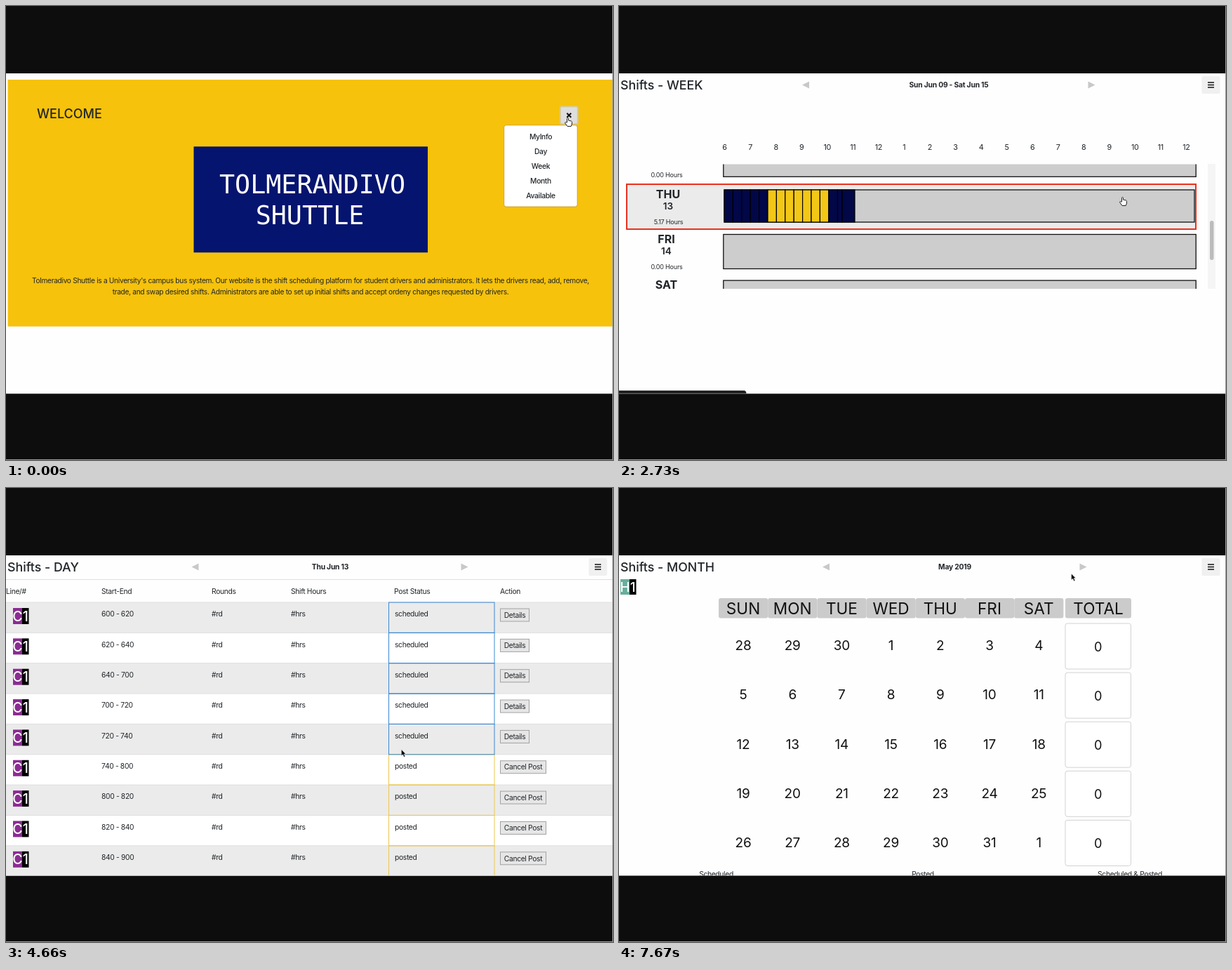
Recreate the animation shown at these times as an HTML page. Size 865 px wide and 647 px high, loop 7770 ms.

```html
<!DOCTYPE html>
<html lang="en">
<head>
<meta charset="utf-8">
<title>Shift scheduling tour</title>
<style>
html, body { margin: 0; width: 100%; height: 100%; overflow: hidden; background: #fff; }
svg { display: block; width: 100vw; height: 100vh; }
text { font-family: Inter, "Open Sans", sans-serif; white-space: pre; }
.mono { font-family: "DejaVu Sans Mono", monospace; }
</style>
</head>
<body>
<svg id="stage" viewBox="0 0 865 647"></svg>
<script>
const LOOP = 7770;
const GROUPS = [130, 1230, 2310, 3400, 4510, 5610, 6710]; // eight steps start at each
const NAVY = '#05146f', GOLD = '#f6c20b', INK = '#212529', BODY = 10.3;
const range = n => [...Array(n).keys()];
const each = (n, fn) => range(n).map(fn).join('');

function text(x, y, str, { size = BODY, weight = 400, anchor = 'middle', fill = INK,
    gap = size < 12 ? -0.34 : 0, cls = '' } = {}) {
  return `<text class="${cls}" x="${x}" y="${y + size * 0.36}" font-size="${size}" font-weight="${weight}"` +
    ` text-anchor="${anchor}" fill="${fill}" letter-spacing="${gap}">${str}</text>`;
}
const rect = (x, y, w, h, fill, stroke = 'none', line = 1, r = 0) =>
  `<rect x="${x}" y="${y}" width="${w}" height="${h}" rx="${r}" fill="${fill}" stroke="${stroke}" stroke-width="${line}"/>`;
const path = (d, stroke, line = 1, fill = 'none') =>
  `<path d="${d}" fill="${fill}" stroke="${stroke}" stroke-width="${line}"/>`;

const title = (str, y = 113) => text(2, y, str, { size: 17.8, weight: 500, anchor: 'start' });

function menu(x, y, shade = '#f0f0f0') {
  return rect(x - 13, y - 12.5, 26, 25, shade, 'none', 0, 2) +
    path(`M${x - 4.5} ${y - 3.5}h9m-9 3.5h9m-9 3.5h9`, '#111', 1.5);
}

function pager(left, right, mid, label) {
  return path(`M${left + 5} 107.5v10l-10-5z`, 'none', 0, '#c8c8c8') +
    path(`M${right - 5} 107.5v10l10-5z`, 'none', 0, '#c8c8c8') +
    text(mid, 112.5, label, { weight: 700, gap: -0.2 });
}

function badge(x, y, w1, w2, h, letter, digit, fill) {
  const style = { size: h * 0.85, weight: 500, fill: '#fff' };
  return rect(x, y, w1, h, fill) + rect(x + w1, y, w2, h, '#000') +
    text(x + w1 / 2, y + h / 2, letter, style) + text(x + w1 + w2 / 2, y + h / 2, digit, style);
}

function welcome() {
  const name = { size: 36.7, fill: '#fff', cls: 'mono' };
  const copy = { size: 10.2, gap: -0.32 };
  return rect(2.6, 105, 862, 351.7, GOLD) +
    text(44, 153.5, 'WELCOME', { size: 18, weight: 500, anchor: 'start' }) +
    rect(267.5, 200.3, 333.5, 151, NAVY) +
    text(436.5, 254, 'TOLMERANDIVO', name) + text(433, 298, 'SHUTTLE', name) +
    text(434, 391.5, "Tolmeradivo Shuttle is a University's campus bus system. Our website is the shift scheduling platform for student drivers and administrators. It lets the drivers read, add, remove,", copy) +
    text(434, 407, 'trade, and swap desired shifts. Administrators are able to set up initial shifts and accept ordeny changes requested by drivers.', copy) +
    rect(789.8, 143.3, 25, 25, '#dedede', '#d8c98f', 2, 2) +
    path('M799.3 152.8l6 6m0-6l-6 6', '#111', 2) +
    rect(709.7, 169.8, 104.5, 116.3, '#fff', '#d3a02a', 1, 3) +
    ['MyInfo', 'Day', 'Week', 'Month', 'Available'].map((s, i) =>
      text(762, 186.5 + 21 * i, s, { weight: 500 })).join('');
}

const clock = m => Math.floor(m / 60) + String(m % 60).padStart(2, '0');

function day() {
  const left = { anchor: 'start' };
  const row = i => {
    const y = 163 + 43.35 * i, free = i < 5;
    const start = 360 + 20 * i, action = free ? 'Details' : 'Cancel Post', w = free ? 41 : 65;
    return rect(0, y, 864, 43.35, i % 2 ? '#fff' : '#ebebeb') +
      path(`M0 ${y}h864`, '#dedede') +
      badge(10, y + 8, 13, 9.5, 23, 'C', 1, '#8b2c93') +
      text(136, y + 16.5, `${clock(start)} - ${clock(start + 20)}`, left) +
      text(293, y + 16.5, '#rd', left) + text(406, y + 16.5, '#hrs', left) +
      text(554, y + 16.5, free ? 'scheduled' : 'posted', left) +
      rect(704.5, y + 9, w, 18, '#e6e6e6', '#a2a2a2') + text(704.5 + w / 2, y + 18, action);
  };
  const cell = i => rect(545.5, 163 + 43.35 * i, 150.5, 43.35, 'none', i < 5 ? '#3b88d2' : '#ecc84f');
  return title('Shifts - DAY') + pager(269.5, 653.5, 462, 'Thu Jun 13') + menu(843.5, 112.5) +
    path('M0 130.5h864', '#dedede') +
    [[0, 'Line/#'], [136, 'Start-End'], [293, 'Rounds'], [406, 'Shift Hours'], [553, 'Post Status'], [704, 'Action']]
      .map(([x, s]) => text(x, 147, s, left)).join('') +
    each(9, row) + each(4, i => cell(i + 5)) + each(5, cell);
}

function details() {
  const rowY = i => 247.5 + 32.2 * i;
  const check = (x, i) => rect(x - 5, rowY(i) - 5, 10, 10, '#fff', '#b5b5b5', 1, 2.5);
  const hour = m => `${clock(m).slice(0, 1)}:${clock(m).slice(1)} AM`;
  const grid = (xs, rows) => {
    const [a, b] = [xs[0], xs[xs.length - 1]], end = 231.5 + 32.2 * rows;
    return path(xs.map(x => `M${x} 199V${end}`).join('') +
      each(rows, i => `M${a} ${263.7 + 32.2 * i}H${b}`), '#dcdcdc') +
      path(`M${a} 231.2H${b}`, '#d8d8d8', 1.7);
  };
  const bold = { weight: 700 };
  return title('Shifts - DETAILS', 112) + menu(833.5, 113.5) +
    badge(2, 127, 13.5, 12, 23, 'C', 8, '#8b2c93') +
    text(120, 135.5, '6:30 AM - 7:30 AM') + text(120, 151.5, 'Every Tuesday Recurring | Rounds: 4') +
    grid([11, 98.5, 234, 370], 4) + grid([389.5, 486.5, 740.5], 5) +
    rect(10, 197.5, 741, 326.5, 'none', '#222', 1.6) +
    text(166, 215, 'Start', bold) + text(302, 215, 'End', bold) + text(613, 215, 'Recurring Dates', bold) +
    each(4, i => check(54, i) + text(166, rowY(i), hour(390 + 15 * i)) + text(302, rowY(i), hour(405 + 15 * i))) +
    each(5, i => check(437, i) +
      text(613, rowY(i), new Date(Date.UTC(2019, 6, 23 + 7 * i)).toISOString().slice(0, 10))) +
    ['Post', 'Trade/Swap', 'My Shifts'].map((s, i) =>
      rect(769, 197.5 + 30.2 * i, 70.5, 24.5, '#fff', '#666', 1, 3) + text(804, 210 + 30.2 * i, s)).join('');
}

function week(f) {
  const settled = f >= 19;
  const scroll = 257 * Math.min(1, (f - 16) / 3);
  const blocks = [...range(13).map(i => 150 + 12.4 * i), 311.5, 318, 336];
  const row = (name, i) => {
    const y = 259.9 + 65.6 * (i - 4) + 257 - scroll, thu = i === 4, hover = thu && settled;
    const x = hover ? 70 : 67.5, dy = hover ? 2 : 0;
    const bar = hover ? [150, 262, 670, 46] : [148.8, y, 673.4, 49];
    return (hover ? rect(11, 254, 811, 64, '#ebebeb', '#e8321f', 2) : '') +
      rect(...bar, '#cdcdcd', '#111', 1.3) +
      (thu ? each(15, n => rect(blocks[n], bar[1], blocks[n + 1] - blocks[n], bar[3],
        n > 4 && n < 12 ? '#f2c716' : '#020748', '#000', 1.2)) : '') +
      text(x, y + 6.5 + dy, name, { size: 16, weight: 700 }) +
      text(x, y + 23.5 + dy, 9 + i, { size: 13.6, weight: 600 }) +
      text(x + .5, y + 46 + dy, (thu ? '5.17' : '0.00') + ' Hours', { size: 9, gap: -0.2 });
  };
  return title('Shifts - WEEK') + pager(266, 673.5, 470, 'Sun Jun 09 - Sat Jun 15') + menu(843.5, 112.5) +
    each(19, i => text(150.5 + 36.55 * i, 201.5, (i + 5) % 12 + 1, { size: 10.8 })) +
    '<g clip-path="url(#list)">' +
    ['SUN', 'MON', 'TUE', 'WED', 'THU', 'FRI', 'SAT'].map(row).join('') + '</g>' +
    rect(839, 225, 11, 178, '#f5f5f5') +
    rect(842, 225 + 81 * scroll / 257, 5.5, 56, '#bcbcbc', 'none', 0, 2.7) +
    (settled ? path('M0 548h178q3.5 0 3.5 4.5H0z', 'none', 0, '#222') : '');
}

function month(june) {
  const colX = i => 177 + 70.2 * i, rowY = i => 224.5 + 70.1 * i;
  const names = ['SUN', 'MON', 'TUE', 'WED', 'THU', 'FRI', 'SAT'];
  const head = { size: 22.6, fill: '#111' };
  const dateAt = n => new Date(2019, june ? 4 : 3, (june ? 26 : 28) + n).getDate();
  const number = n => {
    const x = colX(n % 7), y = rowY(Math.floor(n / 7)), picked = june && n === 18;
    return (picked ? `<circle cx="${x}" cy="${y - 1}" r="31.8" fill="${NAVY}" stroke="${GOLD}" stroke-width="2.6"/>` : '') +
      text(x, y, dateAt(n), { size: 19, gap: -0.2, fill: picked ? '#fff' : '#111' });
  };
  const total = i => {
    const empty = june && i !== 2;
    return rect(636, 193 + 70.1 * i, 93.5, 65, '#fff', '#d2d2d2', 1, 3) +
      text(682.7, rowY(i) + 2, june ? (empty ? 'No Shifts' : '5h 0m') : 0,
        { size: 18.2, gap: -0.2, fill: empty ? '#c6c6c6' : '#111' });
  };
  return title('Shifts - MONTH') + pager(295, 661.5, 478.5, june ? 'June 2019' : 'May 2019') +
    menu(843.5, 112.5, june ? '#fff' : undefined) +
    badge(2, 130, 13, 9.5, 22, 'H', 1, '#69ad9d') +
    names.map((s, i) => rect(142 + 70.2 * i, 157, 70.2, 28.5, '#cbcbcb', 'none', 0, 3) +
      text(colX(i), 171.5, s, head)).join('') +
    rect(636, 157, 94, 28.5, '#cbcbcb', 'none', 0, 3) + text(683, 171.5, 'TOTAL', head) +
    each(35, number) + each(june ? 6 : 5, total) +
    (june ? '' : text(138.5, 550, 'Scheduled') + text(433, 550, 'Posted') + text(728, 550, 'Scheduled &amp; Posted'));
}

function confirmPost() {
  return text(427, 108, 'PLEASE CONFIRM:', { size: 20.3, weight: 500 }) +
    text(429, 133, 'Do you really want to post this shift?', { size: 19.4, weight: 500 }) +
    rect(408.5, 194.5, 41, 18, '#e6e6e6', '#a2a2a2') + text(429, 203.5, 'Cancel') +
    rect(383.5, 267, 91.5, 18.5, '#e6e6e6', '#a2a2a2') + text(429.3, 276.5, 'Yes, I want to post');
}

// first step, view, hand pointer
const SCENES = [
  [0, welcome, true], [5, day], [9, details], [16, week, true], [24, () => month(true)],
  [33, day], [39, confirmPost, true], [44, day], [51, () => month(false)]
];
// step, x, y
const TRAIL = [
  [0, 801, 165], [4, 762, 208], [8, 724, 181], [12, 445, 252], [15, 833, 114], [16, 843, 113],
  [20, 718, 278], [23, 843, 113], [27, 762, 254], [32, 457, 364], [37, 724, 398], [41, 431, 203],
  [43, 431, 203], [49, 649, 119], [51, 843, 113], [56, 645, 127]
];

function pointer(f, hand) {
  const i = Math.max(1, TRAIL.findIndex(k => k[0] >= f));
  const [fa, xa, ya] = TRAIL[i - 1], [fb, xb, yb] = TRAIL[i];
  const p = (f - fa) / (fb - fa);
  const shape = hand
    ? path('M-1.5 1V-4.3q0-1.2 1-1.2t1 1.2V-2l4 1q1 .4 1 1.6V3L4.2 6.5H-1L-4.2 2q-.6-1 .3-1.4t1.4.4z', '#222', 1, '#fff')
    : path('M-.5-5V4.2l2.2-2 1.6 3.6 1.7-.8-1.6-3.4H6z', '#fff', 0.6, '#000');
  return `<g transform="translate(${xa + (xb - xa) * p} ${ya + (yb - ya) * p})">${shape}</g>`;
}

function stepAt(t) {
  const g = GROUPS.findLastIndex(s => t >= s);
  return g < 0 ? 0 : 1 + 8 * g + Math.min(7, Math.floor((t - GROUPS[g]) / 137));
}

const stage = document.getElementById('stage');
let shown = -1;

function draw(f) {
  const [, view, hand] = SCENES.findLast(s => f >= s[0]);
  stage.innerHTML =
    '<clipPath id="list"><path d="M0 225.5h830V403H0z"/></clipPath>' +
    '<clipPath id="page"><path d="M0 96h864v456.4H0z"/></clipPath>' +
    rect(0, 0, 865, 647, '#999') + rect(0, 0, 864, 646, '#0d0d0d') +
    `<g clip-path="url(#page)">${rect(0, 96, 864, 457, '#fefefe')}${view(f)}${pointer(f, hand)}</g>`;
}

function tick() {
  const f = stepAt(performance.now() % LOOP);
  if (f !== shown) draw(shown = f);
  requestAnimationFrame(tick);
}
tick();
</script>
</body>
</html>
```
